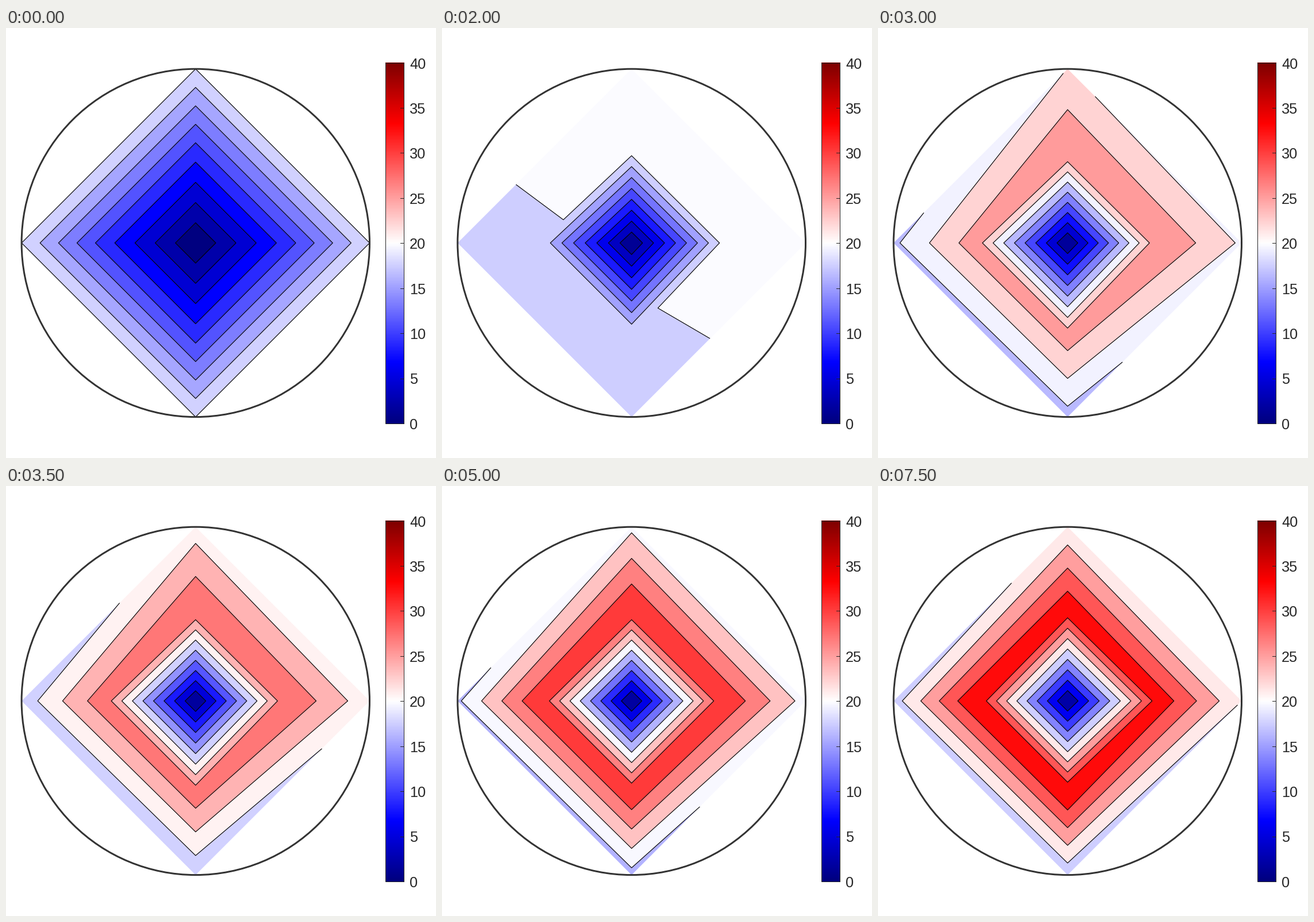
These frames come from a looping animation (748x748 px, 8000 ms). A matplotlib script:

```python
import numpy as np
import matplotlib.pyplot as plt
from matplotlib.animation import FuncAnimation
from matplotlib.colors import LinearSegmentedColormap, Normalize
from matplotlib.patches import Circle, Rectangle

SIZE, DPI = 748, 100
FRAMES, INTERVAL = 16, 500
CX, CY, R = 329.8, 373.9, 302.7
RADII = np.array([0, 159, R])
BANDS = 9
INK = "#262626"
PX = 72 / DPI

cmap = LinearSegmentedColormap.from_list("cold_hot", [
    (0, (0, 0, .5)), (1 / 6, (0, 0, 1)), (.5, (1, 1, 1)),
    (5 / 6, (1, 0, 0)), (1, (.5, 0, 0))])
norm = Normalize(0, 40)

# Mean temperature of the middle ring at a few times (s)
KEY_T = np.array([0, 1, 2, 3, 4, 6, 7.5])
KEY_V = np.array([9.9, 11.9, 19.97, 27.49, 31.39, 34.69, 36.03])
KEY_SLOPE = np.gradient(KEY_V, KEY_T)

# Directions run east, north, west, south
WARM = np.array([1, 1, -1, -1])
SPLIT = np.array([-1, 1, 0, 0])
GAIN = np.array([2.7, 3.35, 1.75, 2.2])
LAG = np.array([1.2, 1.35, .9, 1.1])
DRIFT = np.array([.145, .125, .2, .155])


def ring_mean(t):
    """Cubic Hermite curve through the key points."""
    i = min(np.searchsorted(KEY_T, t, side="right") - 1, len(KEY_T) - 2)
    dt = KEY_T[i + 1] - KEY_T[i]
    u = (t - KEY_T[i]) / dt
    return ((1 + 2 * u) * (1 - u) ** 2 * KEY_V[i]
            + u * u * (3 - 2 * u) * KEY_V[i + 1]
            + u * (1 - u) * dt * ((1 - u) * KEY_SLOPE[i] - u * KEY_SLOPE[i + 1]))


def temperature(t):
    """Rows: centre, middle ring, rim; one column per direction."""
    centre = np.full(4, 2.3 * (1 - np.exp(-t / 3)))
    contrast = (2.7 - .5 * t) * t ** 5 / (t ** 5 + 17)
    middle = ring_mean(t) + WARM * contrast / 2 + SPLIT * .035 * t
    rim = 19.7 + WARM * (GAIN * (1 - np.exp(-t / LAG)) - DRIFT * t)
    return np.array([centre, middle, rim])


fig = plt.figure(figsize=(SIZE / DPI, SIZE / DPI), dpi=DPI, facecolor="white")
ax = fig.add_axes([0, 0, 1, 1])
ax.axis("off")

# Colour bar
LEFT, RIGHT, TOP, BOTTOM = 660.4, 692.5, 60.6, 688
ax.imshow(np.linspace(40, 0, 256)[:, None], cmap=cmap, norm=norm,
          extent=(LEFT, RIGHT, BOTTOM, TOP), aspect="auto")
ax.add_patch(Rectangle((LEFT, TOP), RIGHT - LEFT, BOTTOM - TOP,
                       fill=False, ec=INK, lw=PX))
for v in range(0, 41, 5):
    y = BOTTOM - v / 40 * (BOTTOM - TOP)
    ax.plot([RIGHT - 6, RIGHT], [y, y], color=INK, lw=PX)
    ax.text(702, y + .4, str(v), family="Liberation Sans", fontsize=25.2 * PX,
            color=INK, va="center_baseline", ha="left")

ax.add_patch(Circle((CX, CY), R, fill=False, ec="#333333", lw=3 * PX, zorder=5))

unit = np.array([[1, 0, -1, 0, 1], [0, -1, 0, 1, 0]])
X = CX + RADII[:, None] * unit[0]
Y = CY + RADII[:, None] * unit[1]
outline, = ax.plot(X[-1], Y[-1], color="black", lw=1.15 * PX, zorder=3)
ax.set_xlim(0, SIZE)
ax.set_ylim(SIZE, 0)

drawn = []


def update(frame):
    while drawn:
        drawn.pop().remove()
    rings = temperature(frame * INTERVAL / 1000)
    Z = np.column_stack([rings, rings[:, 0]])
    levels = np.linspace(Z.min(), Z.max(), BANDS + 1)
    edges = levels.copy()
    edges[0] -= .001
    edges[-1] += .001
    drawn.append(ax.contourf(X, Y, Z, levels=edges, antialiased=True,
                             colors=cmap(norm(levels[:-1])), zorder=2))
    drawn.append(ax.contour(X, Y, Z, levels=levels[1:-1], colors="black",
                            linewidths=1.15 * PX, zorder=3))
    # An even rim coincides with the top level.
    outline.set_visible(bool(np.ptp(rings[-1]) < 1e-6))
    return drawn


anim = FuncAnimation(fig, update, frames=FRAMES, interval=INTERVAL,
                     init_func=lambda: [], repeat=True, repeat_delay=0, blit=False)
plt.show()
```
